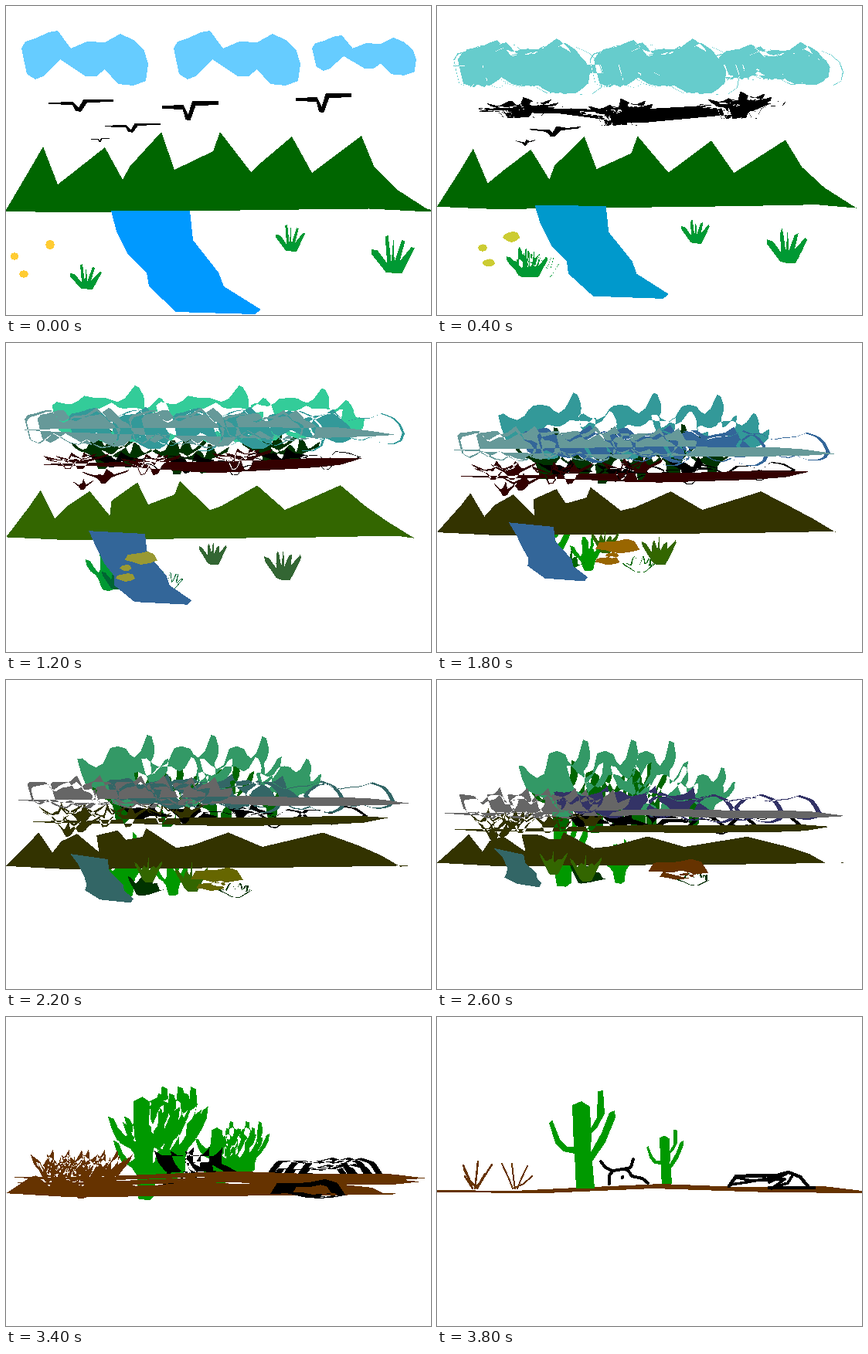
These frames come from a looping animation (550 by 400 pixels, 4 s). An HTML page:

```html
<!DOCTYPE html>
<html lang="en">
<head>
<meta charset="utf-8">
<title>Valley to desert</title>
<style>
  html, body { margin: 0; width: 100%; height: 100%; overflow: hidden; background: #fff; }
  svg { display: block; width: 550px; height: 400px; shape-rendering: crispEdges; }
</style>
</head>
<body>
<svg id="stage" viewBox="0 0 550 400" xmlns="http://www.w3.org/2000/svg"></svg>
<script>
const STEP = 200, STEPS = 20, SAMPLES = 14;
const stage = document.getElementById('stage');

const rows = (text, size) => {
  const n = text.trim().split(/\s+/).map(Number);
  return Array.from({ length: n.length / size }, (_, i) => n.slice(i * size, i * size + size));
};
// An outline is three chains: left tip to high point, to right tip, back along the bottom.
const outline = text => text.split('|').map(chain => rows(chain, 2))
  .map((chain, i, all) => [...chain, all[(i + 1) % all.length][0]]);
const place = (shape, kx, ky, dx, dy) =>
  shape.map(chain => chain.map(([x, y]) => [x * kx + dx, y * ky + dy]));
const shrink = (shape, k, cx, cy) => place(shape, k, k, cx * (1 - k), cy * (1 - k));

function resample(chain) {
  const at = [0];
  for (let i = 1; i < chain.length; i++) {
    at.push(at[i - 1] + Math.hypot(chain[i][0] - chain[i - 1][0], chain[i][1] - chain[i - 1][1]));
  }
  const total = at[at.length - 1];
  return Array.from({ length: SAMPLES }, (_, s) => {
    const d = total * s / SAMPLES;
    let i = 1;
    while (at[i] < d) i++;
    const u = (d - at[i - 1]) / (at[i] - at[i - 1] || 1);
    return [0, 1].map(c => chain[i - 1][c] + (chain[i][c] - chain[i - 1][c]) * u);
  });
}
const sampled = shape => shape.flatMap(resample);
const morph = (a, b) => {
  const end = sampled(b);
  return sampled(a).map((p, i) => [...p, ...end[i]]);
};
const cross = (sources, targets) => sources.flatMap(a => targets.map(b => morph(a, b)));

const pathOf = points => 'M' + points.map(p => p[0].toFixed(1) + ' ' + p[1].toFixed(1)).join('L') + 'Z';
const mix = (morphs, t) => morphs.map(m =>
  pathOf(m.map(([x, y, X, Y]) => [x + (X - x) * t, y + (Y - y) * t]))).join('');

// Colours snap to the 216 colour cube while they blend.
const blend = (from, to, t) => 'rgb(' + from.map((v, i) =>
  Math.max(0, Math.round((v + (to[i] - v) * t - 2) / 51) * 51)).join(',') + ')';

const rgb = hex => [0, 2, 4].map(i => parseInt(hex.substr(i, 2), 16));
const [SKY, GREEN, BROWN, BLACK, LEAF, SAND, FOREST, WATER] =
  ['66ccff', '009900', '663300', '000000', '009933', 'ffcc33', '006600', '0099ff'].map(rgb);
const css = c => `rgb(${c})`;

// Valley
const cloud = outline(`20 55 25 46 38 42 55 34 67 32 84 55 105 46 128 47|
  148 36 165 44 179 58|184 75 181 97 165 103 145 101 128 82 117 91 103 91 70 69 48 91 38 95 27 88`);
const clouds = [cloud, place(cloud, 1, 1, 197, 0), place(cloud, .823, .73, 379.5, 14.6)];

const bird = outline('55 125 87 124 94 132|100 121|139 121 139 124 105 125 97 137 90 136 86 128 55 127');
const birds = [bird, place(bird, .87, 1.6, 154, -70.6), place(bird, .857, 1.6, 328, -80.6)];
const smallBirds = [place(bird, .857, .75, 81, 61), place(bird, .286, .33, 94.5, 131)];

const grass = outline(`83 346 89 347 98 358 96 335 99 334 102 357|
  104 336 105 357 112 338 115 339 110 356|121 344 124 345 112 367 97 366 83 350`);
const midGrass = place(grass, .92, 1.06, 273, -71);
const bigGrass = place(grass, 1.36, 1.5, 360, -204);

const disc = outline('-1 0 -.7 -.7|0 -1 .7 -.7|1 0 .7 .7 0 1 -.7 .7');
const dots = [place(disc, 6, 6.5, 57, 309), place(disc, 5.5, 5, 11, 324), place(disc, 6, 5, 23, 347)];

// Each row: start point, then end point.
const mountain = rows(`0 264 0 224  30 213 33 206  48 182 38 208  67 231 55 218
  90 213 58 206  128 183 66 211  151 225 98 221  160 208 86 196  201 163 103 218
  218 212 110 203  268 188 110 214  277 163 112 213  317 215 150 219  325 207 180 219
  370 169 228 218  396 216 285 216  460 168 374 219  476 207 440 219  505 237 470 219
  550 266 482 224  484 261 550 225  380 263 430 227  75 267 80 229`, 4);
const river = rows(`136 265 45 196  238 265 54 208  242 303 55 206  275 345 62 207
  282 363 59 207  330 393 45 203  322 399 45 208  220 396 50 203  185 363 42 206
  182 345 48 206  158 322 60 206  143 292 57 199`, 4);

// Desert
const cactus = outline(`145 137 149 133 159 158 168 168 177 168 175 114 187 109 198 116 199 144 207 130|
  208 96 215 95 217 125 208 142 200 150 199 175 213 150 223 124|
  230 121 231 130 218 162 201 187 204 222 180 222 178 177 163 174 153 163`);
const cacti = [cactus, place(cactus, .56, .555, 190, 93)];
const rock = outline('376 220 386 204 430 204|455 199 472 204|484 222 430 225 400 218');
const rocks = [rock, shrink(rock, .8, 430, 212)];
const bush = outline('33 192 44 210|51 187 50 210|70 191 55 222 45 222');
const bushes = [bush, shrink(bush, .5, 50, 215), place(bush, .95, 1, 54, 0)];
const skull = outline('212 187 220 196 246 195|254 184 250 206|273 216 240 213 223 217');
const ground = outline('0 224 100 225 180 221|290 216 390 220 500 219|550 225 550 228 430 227 280 222 140 228 0 227');
const skyBand = outline('20 60 150 58|330 60 420 58|484 70 330 78');
const birdBand = outline('55 126 150 122|240 125 340 118|420 114 390 128 250 144 160 129');

const layers = [
  [LEAF, GREEN, cross([grass], cacti)],
  [LEAF, BLACK, cross([grass], [skull, ...rocks.map(r => shrink(r, .45, 445, 216))])],
  [FOREST, BROWN, [mountain]],
  [WATER, BROWN, [river]],
  [BLACK, BROWN, cross(smallBirds, [bush])],
  [BLACK, GREEN, cross(birds, cacti)],
  [BLACK, BLACK, cross(birds, [...rocks, skull])],
  [BLACK, BROWN, [...cross(birds, bushes), morph(birdBand, ground)]],
  [SKY, GREEN, cross(clouds, cacti)],
  [SKY, BLACK, cross(clouds, [...rocks, skull])],
  [SKY, BROWN, [...cross(clouds, bushes), morph(skyBand, ground)]],
  [LEAF, BROWN, cross([midGrass, bigGrass], [bush])],
  [SAND, BLACK, [morph(dots[0], rock), morph(dots[1], shrink(rock, .22, 477, 222)),
    morph(dots[2], shrink(rock, .5, 450, 206))]]
].map(([from, to, morphs]) => ({ from, to, morphs }));

const fill = (color, ...shapes) => shapes.map(s =>
  `<path fill="${css(color)}" d="${pathOf(s.flat())}"/>`).join('');
const lines = (color, width, text) => text.split('|').map(points =>
  `<polyline fill="none" stroke="${css(color)}" stroke-width="${width}" stroke-linecap="round" stroke-linejoin="round" points="${points}"/>`).join('');
// Twigs fan out from a short stretch of ground around x.
const twigs = (x, width, tips) => rows(tips, 2).map(([tx, ty], i) =>
  lines(BROWN, width, `${x + i % 3 * 3 - 3} 222 ${(x + tx) / 2} ${(226 + ty) / 2} ${tx} ${ty}`)).join('');

const valley = fill(SKY, ...clouds) + fill(BLACK, ...birds, ...smallBirds) +
  fill(FOREST, [mountain]) + lines(FOREST, 3, '0 264 75 266 380 262 470 261 549 265') +
  fill(WATER, [river]) + fill(SAND, ...dots) + fill(LEAF, grass, midGrass, bigGrass);

const skullArt = lines(BLACK, 4,
  '223 216 223 205 228 199 246 196 252 206 266 209 273 215|212 187 218 195 227 199|254 184 251 194 245 198|240 207 240 208');
const rockArt = lines(BLACK, 4.5, '378 219 387 206 440 205 455 201 470 207 480 219|430 221 488 221') +
  lines(BLACK, 3.5, '388 208 408 212 450 210 433 222|380 217 400 214 440 207|452 203 430 214|460 205 454 215 440 219');
const bushArt = twigs(49, 2.5, '34 192 53 187 71 191 36 206 62 203 35 197') +
  twigs(101, 2, '84 190 97 190 117 193 123 206');
const desert = fill(BROWN, ground) + fill(GREEN, ...cacti) + bushArt + skullArt + rockArt;

stage.innerHTML = `<g>${valley}</g><g>${'<path fill-rule="evenodd"/>'.repeat(layers.length)}</g><g>${desert}</g>`;
const [valleyArt, blendArt, desertArt] = stage.children;
layers.forEach((layer, i) => { layer.path = blendArt.children[i]; });

function draw(step) {
  const t = step / (STEPS - 1);
  const show = (art, on) => { art.style.display = on ? '' : 'none'; };
  show(valleyArt, t === 0);
  show(blendArt, t > 0 && t < 1);
  show(desertArt, t === 1);
  for (const { from, to, morphs, path } of layers) {
    path.setAttribute('d', mix(morphs, t));
    path.setAttribute('fill', blend(from, to, t));
  }
}

let shown = -1;
const origin = performance.now();
function tick() {
  const step = Math.floor((performance.now() - origin) / STEP) % STEPS;
  if (step !== shown) draw(shown = step);
  requestAnimationFrame(tick);
}
tick();
</script>
</body>
</html>
```
